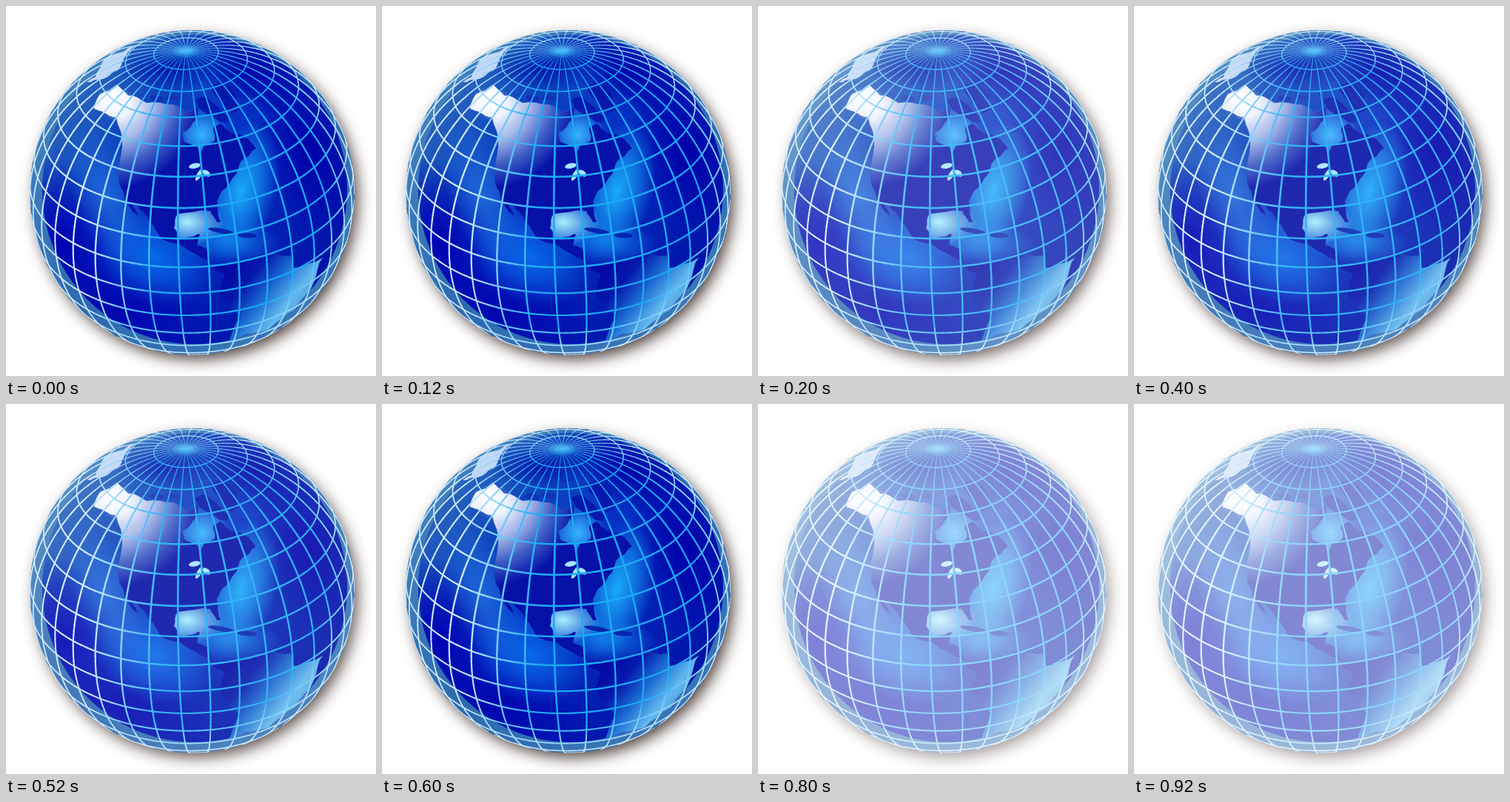
Recreate the animation shown at these times as an HTML page with a canvas. Size 500x500 px, loop 1000 ms.

```html
<!DOCTYPE html>
<html lang="en">
<head>
<meta charset="utf-8">
<title>Globe</title>
<style>
html, body { margin: 0; width: 100%; height: 100%; overflow: hidden; background: #fff; }
canvas { display: block; width: 500px; height: 500px; }
</style>
</head>
<body>
<canvas id="globe" width="500" height="500"></canvas>
<script>
const canvas = document.getElementById('globe');
const g = canvas.getContext('2d');
const CX = 251.5, CY = 252, R = 219.5;
const TAU = Math.PI * 2, RAD = Math.PI / 180;

// Camera: distance in radii, latitude and roll of the view.
const DIST = 12, FOCAL = R * Math.sqrt(DIST * DIST - 1);
const TILT = 33.2 * RAD, ROLL = 2.5 * RAD;

// Key points of the coasts; coast() adds the small bays between them.
const mainland = [
  [119, 139], [127, 119], [150, 106], [165, 121], [190, 131], [226, 133], [247, 144], [259, 137],
  [257, 153], [239, 171], [241, 183], [257, 189], [262, 200], [267, 189], [282, 182], [280, 164],
  [290, 159], [304, 172], [328, 180], [338, 192], [316, 212], [302, 240], [285, 264], [290, 292],
  [285, 292], [276, 277], [232, 281], [227, 300], [234, 314], [248, 312], [262, 308], [258, 323],
  [272, 328], [277, 347], [258, 336], [210, 315], [193, 291], [177, 268], [170, 269], [188, 298],
  [166, 270], [152, 232], [157, 190], [149, 150], [132, 144]
];
const south = [
  [275, 351], [297, 347], [330, 345], [352, 333], [385, 337], [389, 354], [428, 340],
  [417, 371], [390, 410], [355, 437], [300, 457], [317, 420], [290, 392], [296, 362]
];
const asia = [
  [109, 103], [127, 84], [138, 68], [176, 53], [157, 76], [151, 87], [130, 99]
];
const greenland = [[277, 108], [292, 101], [312, 120], [316, 139], [304, 146], [289, 129]];
const baffin = [[256, 126], [272, 124], [301, 150], [299, 158], [264, 141]];

let seed = 7;
const random = () => (seed = (seed * 16807) % 2147483647) / 2147483647;

function coast(points, rough, depth = 2) {
  if (!depth) return points;
  const finer = points.flatMap((p, i) => {
    const q = points[(i + 1) % points.length];
    const k = (random() - 0.5) * rough;
    return [p, [(p[0] + q[0]) / 2 + (q[1] - p[1]) * k, (p[1] + q[1]) / 2 - (q[0] - p[0]) * k]];
  });
  return coast(finer, rough, depth - 1);
}

function shape(points, fill, rough = 0.28) {
  g.beginPath();
  coast(points, rough).forEach(p => g.lineTo(...p));
  g.fillStyle = fill;
  g.fill();
}

function blob(x, y, rx, ry, turn, fill) {
  g.beginPath();
  g.ellipse(x, y, rx, ry, turn * RAD, 0, TAU);
  g.fillStyle = fill;
  g.fill();
}

// Colours spread evenly over the gradient.
function spread(grad, colors) {
  colors.forEach((c, i) => grad.addColorStop(i / (colors.length - 1), c));
  return grad;
}
const linear = (x0, y0, x1, y1, ...colors) => spread(g.createLinearGradient(x0, y0, x1, y1), colors);
const radial = (x, y, r, ...colors) => spread(g.createRadialGradient(x, y, 0, x, y, r), colors);

function glow(x, y, rx, ry, turn, rgb, alpha) {
  g.save();
  g.translate(x, y);
  g.rotate(turn * RAD);
  g.scale(rx, ry);
  blob(0, 0, 1, 1, 0, radial(0, 0, 1,
    `rgba(${rgb},${alpha})`, `rgba(${rgb},${alpha * 0.55})`, `rgba(${rgb},0)`));
  g.restore();
}

function project(colat, lon) {
  const a = (90 - colat) * RAD, b = lon * RAD;
  const out = Math.cos(a) * Math.cos(b), up = Math.sin(a);
  const x = Math.cos(a) * Math.sin(b);
  const y = Math.cos(TILT) * up - Math.sin(TILT) * out;
  const z = Math.sin(TILT) * up + Math.cos(TILT) * out;
  const k = FOCAL / (DIST - z);
  return {
    x: CX + k * (x * Math.cos(ROLL) - y * Math.sin(ROLL)),
    y: CY - k * (x * Math.sin(ROLL) + y * Math.cos(ROLL)),
    z
  };
}

const clamp = v => Math.min(1, Math.max(0, v));
const mix = (a, b, t) => Math.round(a + (b - a) * t);

// Lines are cyan in the middle, pale on the left and at the rim.
function lineColor(x, y) {
  const rim = (Math.hypot(x - CX, y - CY) / R - 0.82) / 0.18;
  const t = clamp(Math.max((210 - x) / 100, rim)) * 0.9;
  return `rgb(${mix(28, 225, t)},${mix(170, 240, t)},${mix(246, 252, t)})`;
}

function line(p, q, width) {
  if (Math.min(p.z, q.z) < 1 / DIST - 0.02) return;
  g.beginPath();
  g.moveTo(p.x, p.y);
  g.lineTo(q.x, q.y);
  g.lineWidth = width * (0.5 + 0.5 * clamp((p.z + q.z) / 2));
  g.strokeStyle = lineColor((p.x + q.x) / 2, (p.y + q.y) / 2);
  g.stroke();
}

function grid() {
  g.lineCap = 'round';
  for (let lon = -175.5; lon < 180; lon += 10) {
    for (let c = 0; c < 178; c += 2) {
      line(project(c, lon), project(c + 2, lon), 0.7 + 1.9 * clamp(c / 40));
    }
  }
  for (let c = 11; c < 150; c += 10.15) {
    for (let lon = -180; lon < 180; lon += 3) {
      line(project(c, lon), project(c, lon + 3), 1.3 + 1.2 * clamp(c / 50));
    }
  }
}

function shadow() {
  g.save();
  g.shadowColor = 'rgb(66,50,46)';
  g.shadowBlur = 21;
  g.shadowOffsetX = 6;
  g.shadowOffsetY = 8;
  blob(CX, CY, R - 3, R - 3, 0, '#555');
  g.restore();
}

function ocean() {
  blob(CX, CY, R, R, 0, linear(70, 90, 430, 420, '#4383bf', '#2d69b0', '#3a78b8'));
  g.save();
  g.beginPath();
  g.ellipse(255, 248, 206, 209, 0, 0, TAU);
  g.clip();
  g.fillStyle = linear(70, 90, 420, 400, '#3674bd', '#0f45bd', '#0430c4', '#0220b4', '#0210a6');
  g.fillRect(0, 0, 500, 500);
  glow(80, 320, 75, 120, -20, '0,0,178', 1);
  glow(160, 410, 140, 75, 15, '0,0,172', 0.9);
  glow(200, 340, 85, 62, 25, '10,115,240', 0.85);
  glow(135, 255, 45, 105, -20, '35,115,225', 0.75);
  glow(410, 195, 70, 130, -15, '0,0,168', 1);
  glow(335, 88, 95, 55, 25, '0,0,165', 0.95);
  glow(215, 85, 70, 30, 0, '0,10,165', 0.8);
  glow(318, 250, 48, 95, 14, '25,170,250', 1);
  glow(300, 318, 75, 32, 5, '20,140,240', 0.75);
  glow(245, 292, 50, 32, 0, '165,242,255', 1);
  glow(265, 174, 38, 38, 0, '55,180,255', 1);
  g.restore();
}

function continents() {
  shape(asia, 'rgba(205,221,247,.95)');
  shape(mainland, radial(140, 122, 125, '#fff', '#e6ecfb', '#a3b6e8', '#3c5cc4', '#0611a8'), 0.2);
  shape(baffin, '#0718ac');
  shape(greenland, '#0718ac');
  shape(south, linear(310, 345, 405, 420, '#0309a3', '#0519ad', '#1b6bd2', '#62b8ee', '#3f92d8'), 0.16);
  blob(291, 304, 18, 3.2, 10, '#0625ae');
  blob(326, 310, 13, 3.5, 3, '#0625ae');
  blob(204, 125, 10, 4, 8, '#1430b4');
  blob(226, 124, 11, 3.5, 8, '#1430b4');
  blob(255, 216, 8, 3.5, -12, '#a5e5ff');
  blob(261, 228, 3, 9, 28, '#a5e5ff');
  blob(271, 226, 6, 3.5, 40, '#a5e5ff');
}

function paint() {
  shadow();
  g.save();
  g.beginPath();
  g.arc(CX, CY, R, 0, TAU);
  g.clip();
  ocean();
  continents();
  glow(155, 135, 34, 24, 30, '255,255,255', 0.6);
  glow(243, 61, 18, 10, 0, '60,195,255', 0.85);
  grid();
  g.restore();
}

paint();

// Each level of the fade holds for one fifth of the loop.
const levels = [1, 0.8, 0.9, 1, 0.5];
const steps = [...levels, 0.5].map((opacity, i) =>
  ({ opacity, offset: i / levels.length, easing: 'steps(1, end)' }));
canvas.animate(steps, { duration: 1000, iterations: Infinity });
</script>
</body>
</html>
```
